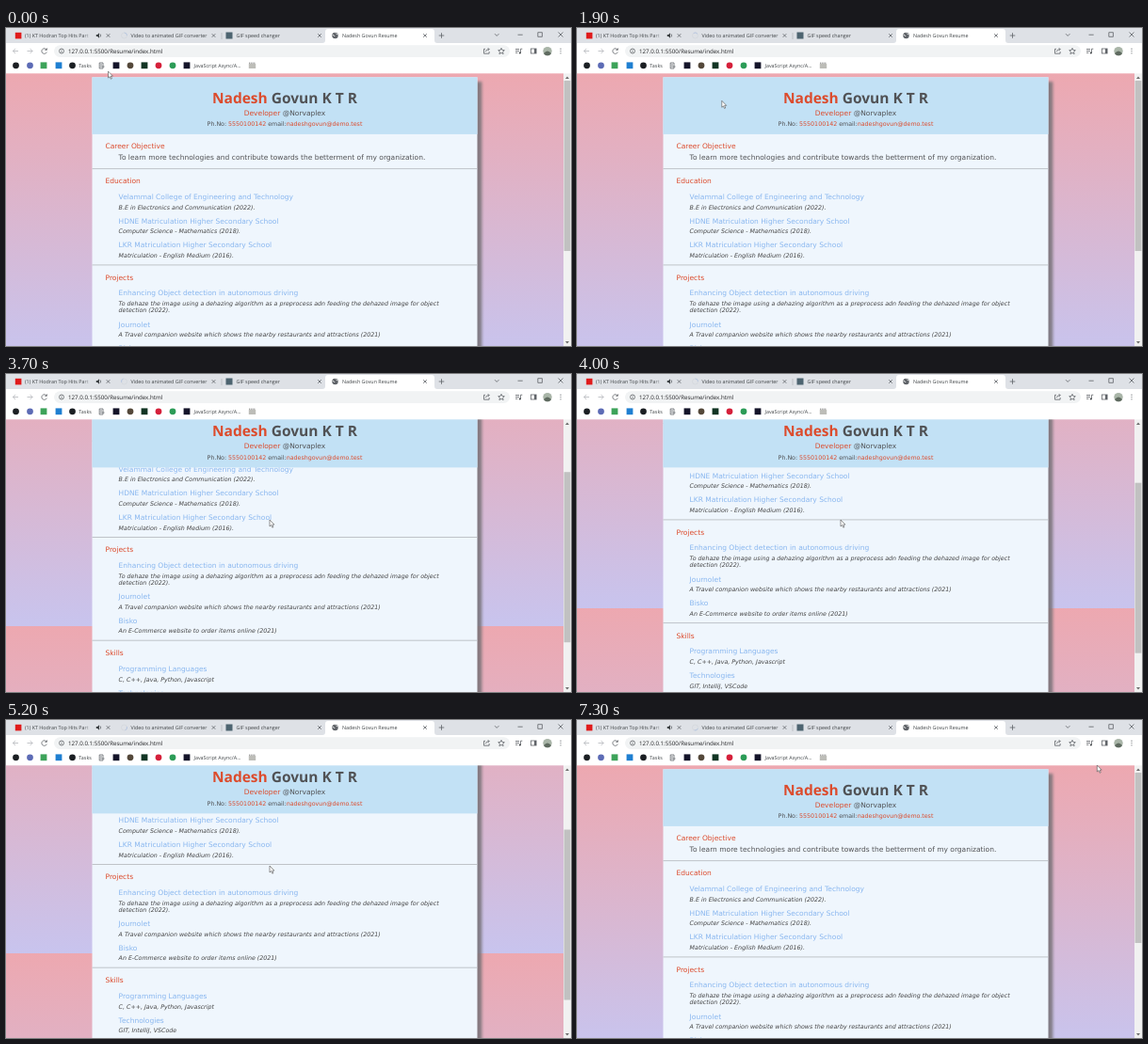
Recreate the animation shown at these times as an HTML page. Size 600x338 px, loop 7400 ms.

```html
<!DOCTYPE html>
<html lang="en">
<head>
<meta charset="utf-8">
<title>Resume</title>
<style>
  html, body { margin: 0; width: 100%; height: 100%; overflow: hidden; background: #fff; }
  svg { display: block; width: 100vw; height: 100vh; }
  text { text-rendering: geometricPrecision; white-space: pre; }
  .ui { font: 5.38px "Open Sans", "Noto Sans", sans-serif; fill: #3c4043; }
  .url { font-size: 6.18px; fill: #202124; }
  .page { font: 7.5px "DejaVu Sans", sans-serif; fill: #505154; }
  .name { font: 600 15.5px "Noto Sans", "Open Sans", sans-serif; }
  .small { font-size: 6.3px; }
  .note { font-size: 6.3px; font-style: italic; fill: #444; }
  .red { fill: #dc4b2c; }
  .link { fill: #88b6ef; }
  .mid { text-anchor: middle; }
  .line { fill: none; stroke: #5f6368; stroke-width: .8; }
  .pale { stroke: #b4b7bb; }
  .rule { stroke: #b3b7bb; stroke-width: .8; }
</style>
</head>
<body>
<svg viewBox="0 0 600 338" preserveAspectRatio="none">
  <defs>
    <linearGradient id="sky" gradientUnits="userSpaceOnUse" x1="0" y1="48" x2="0" y2="346.2" spreadMethod="repeat">
      <stop stop-color="#eda8b0"/><stop offset="1" stop-color="#c8c4ee"/>
    </linearGradient>
    <linearGradient id="fade" gradientUnits="userSpaceOnUse" x1="82" y1="0" x2="91" y2="0">
      <stop stop-color="#dee1e6" stop-opacity="0"/><stop offset="1" stop-color="#dee1e6"/>
    </linearGradient>
    <filter id="soft" filterUnits="userSpaceOnUse" x="80" y="40" width="440" height="640">
      <feGaussianBlur stdDeviation="1.5"/>
    </filter>
  </defs>

  <g id="page" class="page">
    <rect y="48" width="600" height="600" fill="url(#sky)"/>
    <rect x="96.3" y="57" width="409" height="600" fill="#747074" opacity=".85" filter="url(#soft)"/>
    <rect x="91.5" y="52.3" width="409" height="600" fill="#eff6fd"/>
    <g id="content"></g>
  </g>

  <g id="header" class="page mid">
    <rect x="91.5" y="52.3" width="409" height="60.6" fill="#c2e1f5"/>
    <text x="296" y="79.7" class="name"><tspan class="red">Nadesh</tspan> Govun K T R</text>
    <text x="296" y="92.8"><tspan class="red">Developer</tspan> @Norvaplex</text>
    <text x="296" y="104.4" class="small">Ph.No: <tspan class="red">5550100142</tspan> email:<tspan class="red">nadeshgovun@demo.test</tspan></text>
  </g>

  <rect x="592" y="48" width="8" height="290" fill="#f1f1f1"/>
  <path d="M594 54l2-2.4 2 2.4zM594 333l2 2.4 2-2.4z" fill="#6b6b6b"/>
  <rect id="thumb" x="592.6" y="56" width="6.8" height="181" fill="#c1c1c1"/>

  <g id="chrome" class="ui">
    <rect width="600" height="16" fill="#dee1e6"/>
    <rect y="16" width="600" height="32.3" fill="#fff"/>
    <path d="M336 16q3 0 3-3V4q0-3 3-3H452q3 0 3 3v9q0 3 3 3z" fill="#fff"/>
    <path d="M229 5v7" class="line pale"/>

    <rect x="9.8" y="4.8" width="6.6" height="6.6" fill="#e01b1b"/>
    <text x="20" y="10">(1) KT Hodran Top Hits Part</text>
    <rect x="82" y="3" width="12" height="10" fill="url(#fade)"/>
    <path d="M95.8 7h1.4l1.8-1.7v5.4L97.2 9h-1.4z" fill="#3c4043"/>
    <path d="M100 6.3q1.4 1.7 0 3.4" class="line"/>
    <circle cx="125.5" cy="8" r="3" class="line" stroke-opacity=".08"/>
    <path id="spinner" d="M125.5 5a3 3 0 0 1 3 3" fill="none" stroke="#b3c4e2" stroke-width=".8"/>
    <text x="132.5" y="10">Video to animated GIF converter</text>
    <rect x="233.5" y="4.5" width="7" height="7" fill="#4d6470"/>
    <text x="244.5" y="10">GIF speed changer</text>
    <circle cx="349.5" cy="8" r="3.2" fill="#5f6368"/>
    <path d="M347 7.2q1.4.4 2 1.8M350 5.4q1 1.6 2.2 1.2" stroke="#fff" stroke-width=".8" fill="none"/>
    <text x="357" y="10">Nadesh Govun Resume</text>
    <path class="line" d="M459.7 8h5.6M462.5 5.2v5.6"/>
    <path class="line" d="M519 6.2l2.2 2.2 2.2-2.2M543.5 7.2h5.2M564.8 4.7h4.6v4.6h-4.6zM586.5 4.5l5 5m0-5l-5 5"/>

    <path class="line pale" d="M13 24.5H7.4m2.6-2.6l-2.6 2.6 2.6 2.6M22.5 24.5h5.6m-2.6-2.6l2.6 2.6-2.6 2.6"/>
    <path class="line" d="M43 23a2.8 2.8 0 1 0 .3 2.6M43.4 21.4v2h-2"/>
    <rect x="51" y="18.3" width="484" height="12.6" rx="6.3" fill="#f1f3f4"/>
    <circle cx="59" cy="24.5" r="2.5" class="line"/>
    <path d="M59 24.2v1.6M59 22.8v.6" class="line"/>
    <text x="66" y="26.7" class="url">127.0.0.1:5500/Resume/index.html</text>
    <path class="line" d="M509 22.3h-1.5v4.9h5.6V25M509.3 25.3q.2-2.7 3.8-2.7m-1.4-1.5l1.5 1.5-1.5 1.5"/>
    <path class="line" d="M526 21.4l1 2.1 2.3.2-1.7 1.6.5 2.3-2.1-1.2-2.1 1.2.5-2.3-1.7-1.6 2.3-.2z"/>
    <path class="line" d="M541 22.5h4M541 24.4h4M541 26.3h2.3M546.5 26.5v-4.3h1.8"/>
    <circle cx="545.8" cy="26.5" r="1" fill="#3c4043"/>
    <rect x="557.5" y="22" width="5.6" height="5" class="line"/>
    <path d="M561 22h2v5h-2z" fill="#5f6368"/>
    <circle cx="575" cy="24.6" r="4.7" fill="#a9b5a8"/>
    <path d="M571 27a4.7 4.7 0 0 0 8 0q-4-5-8 0z" fill="#5f6b60"/>
    <path d="M589 22.2v0M589 24.5v0M589 26.8v0" stroke="#5f6368" stroke-width="1.2" stroke-linecap="round"/>

    <text x="77.3" y="41.8">Tasks</text>
    <path class="line" d="M99.2 37h3.8v6h-3.8zM100 39h2M100 41h4.5"/>
    <text x="199.5" y="41.8">JavaScript Async/A...</text>
    <path d="M257.8 38h7.4v5h-7.4z" fill="#bdbdb8"/>
    <path d="M258 37.2h7" stroke="#777" stroke-width="1" stroke-dasharray="1.4 .8"/>
  </g>

  <path id="arrow" d="M0 0v7l1.6-1.4 1.2 2.6 1.1-.5-1.1-2.6h2.1z" fill="#fff" stroke="#4a4a4a" stroke-width=".6"/>
  <path id="beam" d="M-1.6-3.8h1.2l.4.4.4-.4h1.2M0-3.4v6.8M-1.6 3.8h1.2l.4-.4.4.4h1.2" fill="none" stroke="#222" stroke-width=".8"/>
</svg>
<script>
const LOOP = 7400, STEP = 100;
const $ = id => document.getElementById(id);

function add(parent, tag, attrs, text = "") {
  const node = document.createElementNS("http://www.w3.org/2000/svg", tag);
  for (const key in attrs) node.setAttribute(key, attrs[key]);
  node.textContent = text;
  parent.append(node);
}

const write = (x, cls) => (y, text) => add($("content"), "text", { x, y, class: cls }, text);
const heading = write(105.5, "red");
const body = write(119.6, "");
const link = write(119.6, "link");
const note = write(119.6, "note");
const rule = y => add($("content"), "path", { d: `M91.5 ${y}h409`, class: "rule" });

heading(128.2, "Career Objective");
body(140.2, "To learn more technologies and contribute towards the betterment of my organization.");
rule(149.6);
heading(165.2, "Education");
link(182, "Velammal College of Engineering and Technology");
note(192.5, "B.E in Electronics and Communication (2022).");
link(207.7, "HDNE Matriculation Higher Secondary School");
note(218.3, "Computer Science - Mathematics (2018).");
link(233.4, "LKR Matriculation Higher Secondary School");
note(244, "Matriculation - English Medium (2016).");
rule(251.9);
heading(267.6, "Projects");
link(284.2, "Enhancing Object detection in autonomous driving");
note(295, "To dehaze the image using a dehazing algorithm as a preprocess adn feeding the dehazed image for object");
note(302.4, "detection (2022).");
link(317.6, "Journolet");
note(328.1, "A Travel companion website which shows the nearby restaurants and attractions (2021)");
link(343.2, "Bisko");
note(353.7, "An E-Commerce website to order items online (2021)");
rule(361.6);
heading(377.7, "Skills");
link(394.4, "Programming Languages");
note(405, "C, C++, Java, Python, Javascript");
link(420.2, "Technologies");
note(430.8, "GIT, IntelliJ, VSCode");

// Tab close buttons
for (const x of [108.5, 220.5, 333, 445])
  add($("chrome"), "path", { d: `M${x - 1.8} 6.2l3.6 3.6m0-3.6l-3.6 3.6`, class: "line" });

// Bookmark icons: x, colour, round
for (const [x, fill, round] of [
  [10.5, "#1b1f23", 1], [25.5, "#5c6bb5", 1], [40, "#3da35a", 0], [56, "#1f7fd1", 0], [70.5, "#1b1f23", 1],
  [117, "#15152a", 0], [132, "#54483a", 1], [147, "#123524", 0], [162, "#d5203a", 1], [177, "#2c9c57", 1], [192, "#15152a", 0]
]) add($("chrome"), "rect", { x: x - 3.4, y: 36.4, width: 6.8, height: 6.8, rx: round * 3.4, fill });

const scrollKeys = [[2600, 0], [3000, 30], [3500, 66], [4000, 97], [4100, 98.4], [5200, 98.4], [5400, 40], [5600, 0]];
const pointerKeys = [
  [0, 108.5, 46], [400, 108.5, 46], [1900, 153.8, 77.3], [2600, 286, 79], [3200, 286, 79],
  [3700, 280, 155], [5300, 280, 155], [6000, 519.5, 117.3], [7200, 552.3, 48], [7400, 552.3, 48]
];

function sample(keys, t, ease = u => u) {
  const next = keys.findIndex(key => key[0] > t);
  if (next === 0) return keys[0].slice(1);
  if (next < 0) return keys[keys.length - 1].slice(1);
  const a = keys[next - 1], b = keys[next];
  const u = ease((t - a[0]) / (b[0] - a[0]));
  return a.slice(1).map((v, i) => v + (b[i + 1] - v) * u);
}

const smooth = u => u * u * (3 - 2 * u);
const move = (id, x, y) => $(id).setAttribute("transform", `translate(${x} ${y})`);
const start = performance.now();

function draw(now) {
  const t = Math.floor((Math.max(0, now - start) % LOOP) / STEP) * STEP;
  const [scroll] = sample(scrollKeys, t);
  const [x, y] = sample(pointerKeys, t, smooth);
  const overText = t >= 2600 && t < 3400;
  move("page", 0, -scroll);
  move("header", 0, -Math.min(scroll, 13.5));
  move("thumb", 0, scroll * .615);
  move("arrow", x, y);
  move("beam", x, y);
  $("arrow").style.display = overText ? "none" : "";
  $("beam").style.display = overText ? "" : "none";
  $("spinner").setAttribute("transform", `rotate(${t * .36} 125.5 8)`);
  requestAnimationFrame(draw);
}
draw(start);
</script>
</body>
</html>
```
